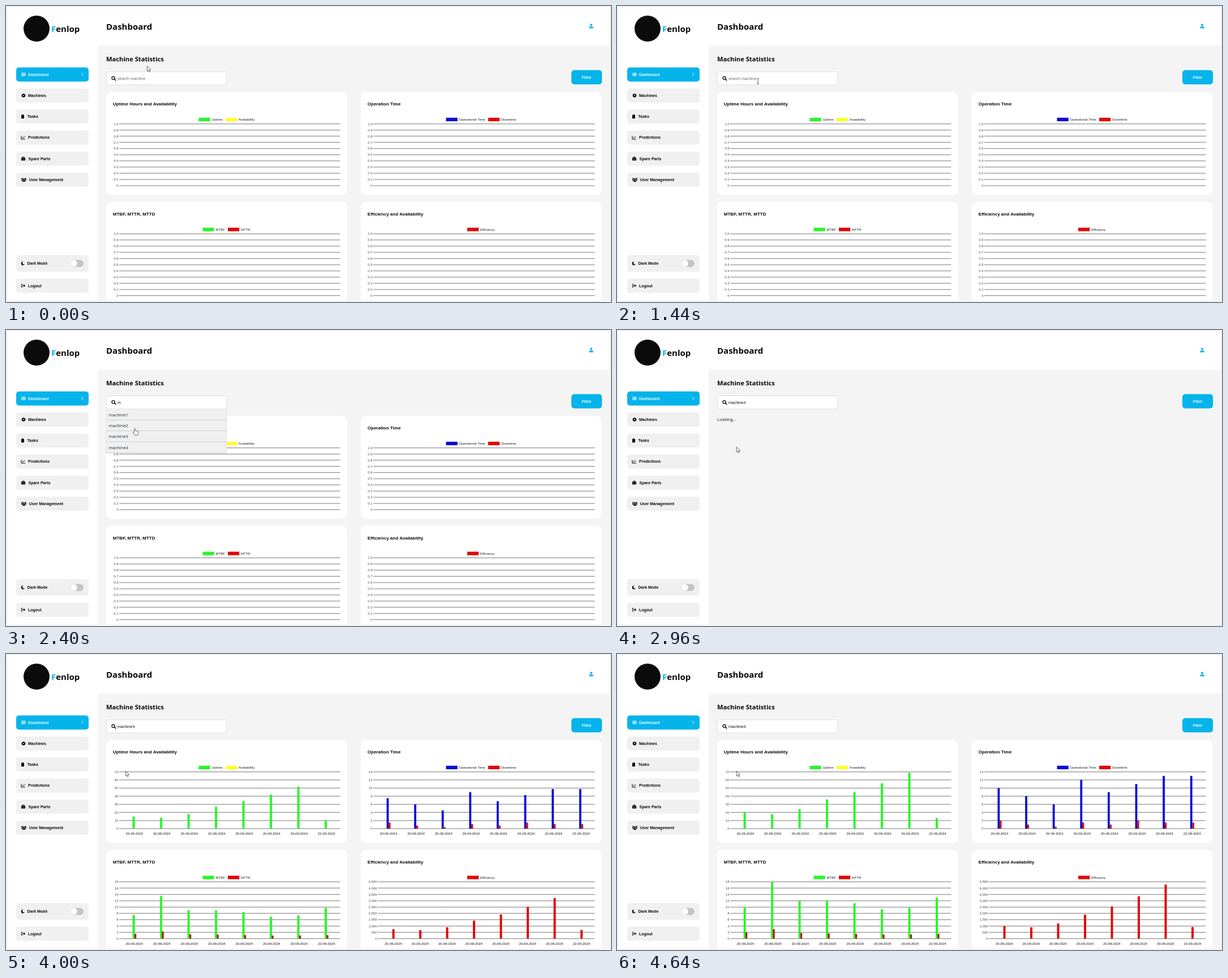
These frames come from a looping animation (1069x524 px, 4720 ms). An HTML page with a canvas:

```html
<!DOCTYPE html>
<html lang="en">
<head>
<meta charset="utf-8">
<title>Machine dashboard</title>
<style>
  html, body { margin: 0; width: 100%; height: 100%; overflow: hidden; background: #fff; }
  canvas { display: block; width: 1069px; height: 524px; filter: blur(0.4px); }
</style>
</head>
<body>
<canvas id="stage"></canvas>
<script>
const W = 1069, H = 524, LOOP = 4720, STEP = 80;
const LOAD_AT = 2800, DATA_AT = 3680, TYPE_AT = 1760, LIST_AT = 1840;
const SANS = '"Liberation Sans", Arial, sans-serif';
const HUMAN = '"Open Sans", "Noto Sans", sans-serif';
const BLUE = '#05b4ea', INK = '#080808';
const GREEN = '#2bf52b', YELLOW = '#ffff2e', NAVY = '#0a0ad6', RED = '#e00808';

const canvas = document.getElementById('stage');
const dpr = window.devicePixelRatio || 1;
canvas.width = W * dpr;
canvas.height = H * dpr;
const c = canvas.getContext('2d');
c.scale(dpr, dpr);

function text(s, x, y, size, color = INK, weight = 400, family = SANS, align = 'left') {
  c.font = `${weight} ${size}px ${family}`;
  c.fillStyle = color;
  c.textAlign = align;
  c.fillText(s, x, y);
}

function rect(x, y, w, h, color) {
  c.fillStyle = color;
  c.fillRect(x, y, w, h);
}

function box(x, y, w, h, r, fill, stroke) {
  c.beginPath();
  c.roundRect(x, y, w, h, r);
  if (fill) { c.fillStyle = fill; c.fill(); }
  if (stroke) { c.strokeStyle = stroke; c.lineWidth = 1; c.stroke(); }
}

function disc(x, y, r, color) {
  c.fillStyle = color;
  c.beginPath();
  c.arc(x, y, r, 0, Math.PI * 2);
  c.fill();
}

function line(points, color, width = 1) {
  c.strokeStyle = color;
  c.lineWidth = width;
  c.beginPath();
  points.forEach(([x, y], i) => i ? c.lineTo(x, y) : c.moveTo(x, y));
  c.stroke();
}

// Icons are drawn around their own centre.
const icons = {
  list() {
    box(-3.5, -3, 7, 6, 1, '#d9f4fd');
    for (let y = -1.4; y < 2; y += 1.6) line([[-2.5, y], [2.8, y]], BLUE, 0.6);
  },
  gear() {
    for (let i = 0; i < 4; i++) {
      const a = i * Math.PI / 4, x = 3.5 * Math.cos(a), y = 3.5 * Math.sin(a);
      line([[-x, -y], [x, y]], INK, 1.6);
    }
    disc(0, 0, 2.7, INK);
    disc(0, 0, 1.1, '#f0f0f0');
  },
  clipboard() {
    box(-2.5, -3, 5, 6.5, 0.8, INK);
    box(-1.3, -3.8, 2.6, 1.6, 0.5, INK);
  },
  graph() {
    line([[-3.3, -3], [-3.3, 2.8], [3.7, 2.8]], INK);
    line([[-2, 1], [-0.3, -0.8], [0.9, 0.3], [3.2, -2.3]], INK);
  },
  toolbox() {
    box(-1.6, -3, 3.2, 2.5, 0.5, null, INK);
    box(-3.7, -1.6, 7.4, 4.8, 0.8, INK);
    line([[-3.7, 0.8], [3.7, 0.8]], '#aaa', 0.6);
  },
  users() {
    for (const [x, y, r] of [[-3, -2, 1.2], [3, -2, 1.2], [0, -0.9, 1.5]]) disc(x, y, r, INK);
    box(-4.5, -0.4, 2.6, 2, 0.8, INK);
    box(1.9, -0.4, 2.6, 2, 0.8, INK);
    box(-2.6, 1, 5.2, 2.6, 1.2, INK);
  },
  moon() {
    disc(0, 0, 3.2, INK);
    disc(1.7, -0.8, 2.6, '#f0f0f0');
  },
  logout() {
    line([[-1, -2.6], [-3.2, -2.6], [-3.2, 2.6], [-1, 2.6]], INK);
    line([[-1.5, 0], [2, 0]], INK, 1.5);
    c.fillStyle = INK;
    c.beginPath();
    c.moveTo(1, -2.4); c.lineTo(3.8, 0); c.lineTo(1, 2.4);
    c.fill();
  },
};

function icon(name, x, y) {
  c.save();
  c.translate(x, y);
  icons[name]();
  c.restore();
}

const menu = [
  ['Dashboard', 'list', 31, 39, 108.7, 25],
  ['Machines', 'gear', 31, 39, 146, 25],
  ['Tasks', 'clipboard', 29.5, 37.5, 183.2, 25],
  ['Predictions', 'graph', 30.3, 39, 220.5, 25],
  ['Spare Parts', 'toolbox', 30.5, 39.5, 257.7, 25],
  ['User Management', 'users', 31.5, 40.7, 295, 25],
  ['Dark Mode', 'moon', 30, 37.5, 441, 29.5],
  ['Logout', 'logout', 30.6, 39, 482.7, 25],
];

function drawSidebar() {
  disc(54, 40, 23, '#0b0b0b');
  text('F', 80, 46, 15, BLUE, 700, HUMAN);
  const first = c.measureText('F').width;
  text('enlop', 80 + first, 46, 15, INK, 700, HUMAN);
  menu.forEach(([label, pic, ix, tx, y, h], i) => {
    const mid = y + h / 2;
    box(18, y, 128, h, 5, i ? '#f0f0f0' : BLUE);
    icon(pic, ix, mid);
    text(label, tx, mid + 2.4, 7, i ? INK : '#e9f9ff', 700);
  });
  line([[133.6, 118.4], [136.2, 121.2], [133.6, 124]], '#e9f9ff');
  box(114, 449.7, 23, 12.3, 6.2, '#c4c4c4');
  disc(120, 455.8, 5.8, '#fff');
}

function drawHeader(t) {
  text('Dashboard', 177, 41.7, 15, INK, 700, HUMAN);
  disc(1034, 33.6, 2, BLUE);
  box(1030.3, 36.2, 7.4, 3.3, [2, 2, 0.5, 0.5], BLUE);
  text('Machine Statistics', 177, 97.8, 11.2, INK, 700, HUMAN);
  box(999, 113.5, 54, 25.3, 5, BLUE);
  text('Filter', 1026, 128.6, 7, '#e9f9ff', 700, SANS, 'center');

  box(177.5, 116.5, 212.5, 23.3, 4, '#fff', '#dcdcdc');
  c.strokeStyle = INK;
  c.lineWidth = 1.3;
  c.beginPath();
  c.arc(189.6, 127.5, 2.6, 0, Math.PI * 2);
  c.stroke();
  line([[191.5, 129.4], [194.2, 132]], INK, 1.5);
  if (t < TYPE_AT) text('search machine', 197, 130.5, 7, '#6c6c6c');
  else text(t < LOAD_AT ? 'm' : 'machine4', 197, 130.5, 7, '#111');
}

function drawList() {
  rect(177, 140, 213, 77.5, '#f0f0f0');
  for (let i = 0; i < 4; i++) {
    const y = 140 + i * 19.4;
    text('machine' + (i + 1), 181.5, y + 12.6, 7.5, '#1c2834', 400, HUMAN);
    line([[177, y + 19.2], [390, y + 19.2]], '#cdcdcd');
  }
  line([[177.3, 140], [177.3, 217]], '#dedede', 0.7);
  line([[389.7, 140], [389.7, 217]], '#dedede', 0.7);
}

// Legend: [label, colour, swatch x]. Bars: [colour, offset, width, values].
const charts = [
  {
    title: 'Uptime Hours and Availability', x: 177, y: 152, max: 70, step: 10,
    legend: [['Uptime', GREEN, 340.5], ['Availability', YELLOW, 388]],
    bars: [[GREEN, -3.2, 4, [20, 18, 24, 36, 45, 56, 69, 13]]],
  },
  {
    title: 'Operation Time', x: 627, y: 152, max: 14, step: 2,
    legend: [['Operational Time', NAVY, 777.5], ['Downtime', RED, 852]],
    bars: [[NAVY, -3.4, 3.8, [10, 8, 6, 12, 9, 11, 13, 13]],
           ['#d01010', 0.2, 3.4, [2, 1, 0.5, 1.5, 1, 2, 1.5, 1.5]]],
  },
  {
    title: 'MTBF, MTTR, MTTD', x: 177, y: 346.7, max: 18, step: 2,
    legend: [['MTBF', GREEN, 347.5], ['MTTR', RED, 392]],
    bars: [[GREEN, -3.2, 4, [10, 18, 12, 12, 11.2, 9.3, 9.8, 13]],
           ['#b81414', 0.2, 3.2, [2, 3, 1.8, 1.7, 1.5, 1.3, 1.3, 1.5]]],
  },
  {
    title: 'Efficiency and Availability', x: 627, y: 346.7, max: 4500, step: 500, inset: 8,
    legend: [['Efficiency', RED, 815]],
    bars: [[RED, -1.8, 4, [1000, 900, 1200, 1900, 2550, 3350, 4280, 920]]],
  },
];

function drawChart(ch, grow) {
  const full = grow >= 0;
  const inset = full ? ch.inset || 0 : 0;
  const max = full ? ch.max : 1, step = full ? ch.step : 0.1;
  const top = ch.y + 56.6, bottom = ch.y + (full ? 157.2 : 166);
  const left = ch.x + (ch.x > 200 ? 22 : 23) + inset, right = ch.x + 413.5;
  const count = Math.round(max / step);

  box(ch.x, ch.y, 425.5, 182.3, 9, '#fff');
  text(ch.title, ch.x + 11.8, ch.y + 24, 8, INK, 700);
  for (const [label, color, x] of ch.legend) {
    rect(x, ch.y + 45.8, 20.3, 6.2, color);
    text(label, x + 23, ch.y + 51, 6, '#222');
  }
  for (let i = 0; i <= count; i++) {
    const y = bottom - (bottom - top) * i / count;
    const value = i * step;
    const label = full ? value.toLocaleString('en-US') : i ? value.toFixed(1) : '0';
    line([[left, y], [right, y]], '#929292', 1.25);
    text(label, left - 1.5, y + 2.1, 6, '#484848', 400, SANS, 'right');
  }
  if (!full) return;

  const start = left + 2.6 + (inset ? 1 : 0), band = (right - start) / 8;
  for (let i = 0; i < 8; i++) {
    const mid = start + band * (i + 0.5);
    text(i < 7 ? '20-09-2024' : '22-09-2024', mid, ch.y + 168, 6, '#111', 400, SANS, 'center');
    for (const [color, dx, w, values] of ch.bars) {
      const h = (bottom - top) * values[i] / max * grow;
      rect(mid + dx, bottom - h, w, h, color);
    }
  }
}

function drawMain(t) {
  rect(162.5, 70.5, 904.5, 451, '#f4f4f4');
  if (t >= LOAD_AT && t < DATA_AT) {
    text('Loading...', 177, 161, 7.5, '#1c1c1c', 400, HUMAN);
    return;
  }
  const p = Math.min(1, (t - DATA_AT + 9) / 1121);
  const grow = t < DATA_AT ? -1 : 1 - (1 - p) ** 4;
  c.save();
  c.beginPath();
  c.rect(162, 70, 905, 451.5);
  c.clip();
  charts.forEach(ch => drawChart(ch, grow));
  c.restore();
}

// Pointer hot spot: [time, x, y].
const path = [
  [0, 249.5, 106.5], [640, 249.5, 106.5], [1040, 249, 133], [1840, 249, 133],
  [2320, 226.5, 174], [2480, 226.5, 174], [2720, 211.2, 207], [LOOP, 211.2, 207],
];

function pointerAt(t) {
  const i = path.findIndex(k => k[0] > t);
  const [t0, x0, y0] = path[i - 1], [t1, x1, y1] = path[i];
  const p = (t - t0) / (t1 - t0), e = p * p * (3 - 2 * p);
  return [x0 + (x1 - x0) * e, y0 + (y1 - y0) * e];
}

const arrowPath = new Path2D('M0 0V9.2L2.1 7.3L3.6 10.4L5 9.7L3.6 6.8H6.3Z');
const handPath = new Path2D('M0 0.8Q1 -0.6 2 0.8V4.4L6.4 5.4Q7.4 5.8 7.2 7.2L6.4 12H1.4L-1.8 8Q-2.2 6.6 -0.8 6.8L0 7.4Z');

function drawPointer(t) {
  const [x, y] = pointerAt(t);
  c.save();
  c.translate(x, y);
  if (y > 116 && y < 140) {
    line([[-1.8, -5], [0, -4.5], [1.8, -5]], '#444', 0.9);
    line([[0, -4.5], [0, 4.5]], '#444', 0.9);
    line([[-1.8, 5], [0, 4.5], [1.8, 5]], '#444', 0.9);
  } else {
    const shape = y < 116 || t >= LOAD_AT ? arrowPath : handPath;
    c.fillStyle = '#fff';
    c.strokeStyle = '#555';
    c.lineWidth = 0.9;
    c.lineJoin = 'round';
    c.fill(shape);
    c.stroke(shape);
  }
  c.restore();
}

function draw(t) {
  rect(0, 0, W, H, '#fff');
  box(1.5, 0.5, 1066.5, 522, 4, '#fff', '#e6e6e6');
  drawSidebar();
  drawMain(t);
  drawHeader(t);
  if (t >= LIST_AT && t < LOAD_AT) drawList();
  drawPointer(t);
}

const origin = performance.now();
function tick() {
  const t = (performance.now() - origin) % LOOP;
  draw(Math.floor(t / STEP) * STEP);
  requestAnimationFrame(tick);
}
tick();
</script>
</body>
</html>
```
